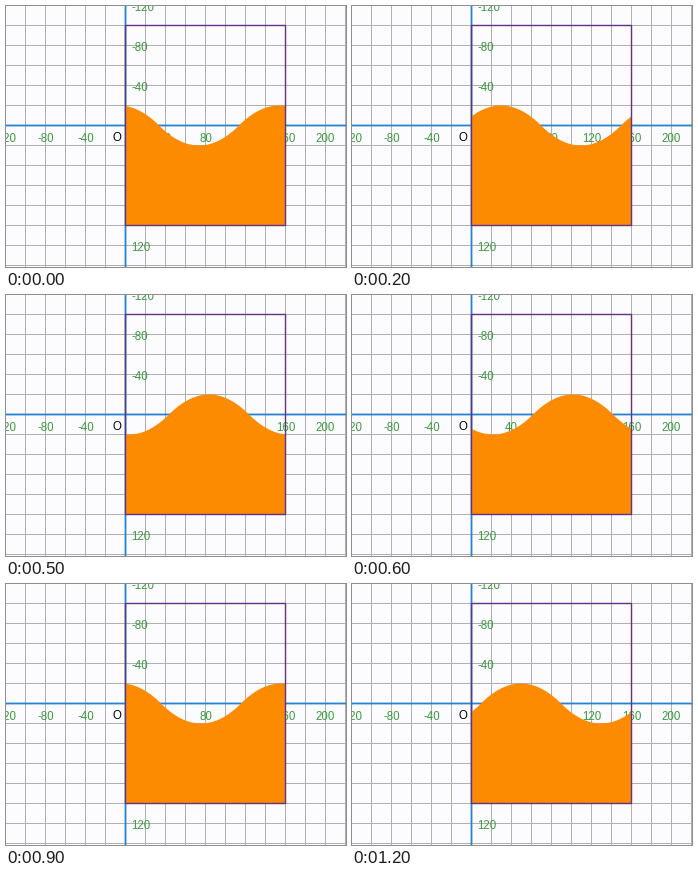
Recreate the animation shown at these times as a matplotlib script. Size 340x261 px, loop 1300 ms.

```python
import numpy as np
import matplotlib.pyplot as plt
from matplotlib.animation import FuncAnimation
from matplotlib.patches import Rectangle

W, H, DPI = 340, 261, 72          # at 72 dpi one point is one pixel
OX, OY = 119.5, 119.5             # origin of the coordinate system
STEP = 20                         # grid spacing
BOX_W, BOX_H = 160, 200
HALF, AMP = 80, 20                # half wavelength and wave height
FRAMES, SPEED, START = 13, 18, -6.5

PAPER, GRID, AXIS = "#fcfbfe", "#b0afb2", "#2583d2"
GREEN, ORANGE, PURPLE = "#3c9a3f", "#fc8b02", "#643282"

plt.rcParams["font.family"] = "Liberation Sans"
fig = plt.figure(figsize=((W + 0.01) / DPI, (H + 0.01) / DPI), dpi=DPI,
                 facecolor=PAPER)
ax = fig.add_axes([0, 0, 1, 1])
ax.set_xlim(0, W)
ax.set_ylim(H, 0)
ax.axis("off")


def line(xs, ys, color, width, z):
    ax.plot(xs, ys, color=color, lw=width, zorder=z, snap=False)


def label(x, y, text, ha="center", color=GREEN):
    ax.text(x, y, text, color=color, size=11.5, ha=ha, va="baseline",
            zorder=3, clip_on=True)


def wave(x, crest):
    """Alternating parabolic arcs, positive upwards."""
    u = (x - crest + HALF / 2) / HALF
    t = u % 1
    sign = np.where(np.floor(u) % 2 == 0, 1, -1)
    return sign * AMP * 4 * t * (1 - t)


for x in np.arange(OX % STEP, W, STEP):
    line([x, x], [0, H], GRID, 1, 1)
for y in np.arange(OY % STEP, H, STEP):
    line([0, W], [y, y], GRID, 1, 1)
line([OX, OX], [0, H], AXIS, 1.8, 2)
line([0, W], [OY, OY], AXIS, 1.8, 2)

for v in range(-120, 201, 40):
    if v:
        label(OX + v, OY + 16.3, str(v))
        if v <= 120:
            label(OX + 6, OY + v + 5.7, str(v), ha="left")
label(OX - 8.3, OY + 15.5, "O", color="black")

xs = np.linspace(0, BOX_W, 321)
fill, = ax.fill([], [], color=ORANGE, lw=0, zorder=4)
ax.add_patch(Rectangle((OX, OY - BOX_H / 2), BOX_W, BOX_H, fill=False,
                       ec=PURPLE, lw=1.4, zorder=5, snap=False))


def update(i):
    top = OY - wave(xs, START + SPEED * i)
    bottom = OY + BOX_H / 2
    fill.set_xy(np.column_stack([
        np.r_[xs, BOX_W, 0] + OX,
        np.r_[top, bottom, bottom],
    ]))
    return fill,


anim = FuncAnimation(fig, update, frames=FRAMES, interval=100,
                     repeat=True, repeat_delay=0, blit=False)
plt.show()
```
